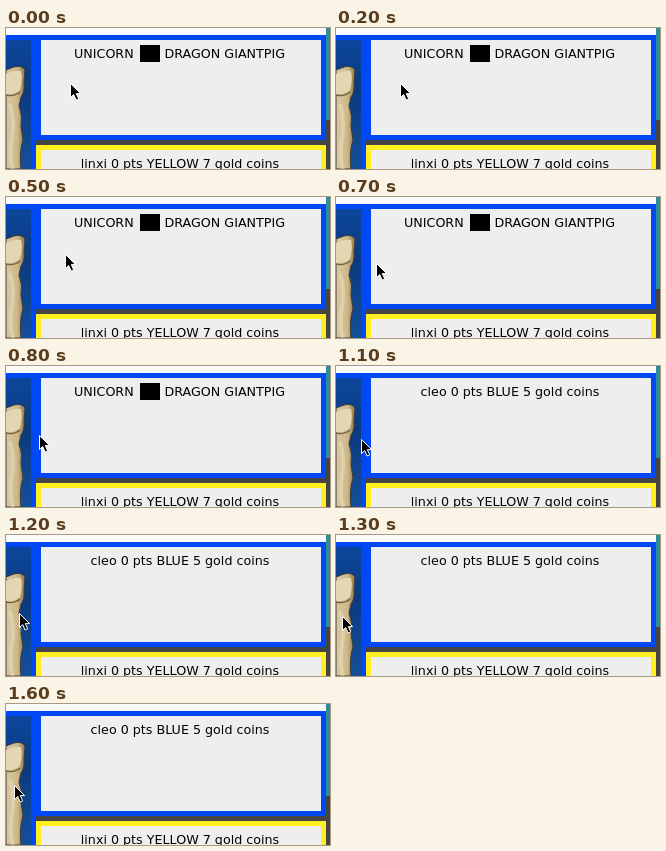
An HTML page that plays this animation: 324 px wide and 141 px high, repeating every 2.27 s.

```html
<!DOCTYPE html>
<html lang="en">
<head>
<meta charset="utf-8">
<style>
  html, body { margin: 0; width: 100%; height: 100%; overflow: hidden; background: #fff; }
  svg { display: block; width: 100%; height: 100%; }
  text { font: 12.7px "DejaVu Sans", "Noto Sans", sans-serif; fill: #000; }
  .mid { text-anchor: middle; }
</style>
</head>
<body>
<svg viewBox="0 0 324 141">
  <defs>
    <linearGradient id="sea" x1="0" y1="0" x2="0" y2="1">
      <stop offset="0" stop-color="#0c469c"/>
      <stop offset=".4" stop-color="#0b3a80"/>
      <stop offset="1" stop-color="#14509a"/>
    </linearGradient>
    <linearGradient id="paper" x1="0" y1="0" x2="1" y2="0">
      <stop offset="0" stop-color="#d9c8a0"/>
      <stop offset=".6" stop-color="#cdb88a"/>
      <stop offset="1" stop-color="#8d7850"/>
    </linearGradient>
    <clipPath id="board"><rect y="12" width="25" height="129"/></clipPath>
  </defs>

  <rect width="324" height="141" fill="#444"/>
  <rect width="320" height="7" fill="#fbfbfd"/>
  <rect x="320" width="4" height="92" fill="#2c8c98"/>

  <!-- board edge with rolled parchment -->
  <rect y="7" width="30" height="134" fill="#0048f4"/>
  <g clip-path="url(#board)">
    <rect y="12" width="25" height="129" fill="url(#sea)"/>
    <path d="M0 42 L8 39 Q16 37 19 42 L18 55 Q19 64 15 69 L13 78 Q17 88 15 98 L17 112 Q13 124 15 141 H0Z"
          fill="url(#paper)" stroke="#3c3a38" stroke-width="1"/>
    <path d="M0 46 Q8 42 15 43 Q17 52 14 62 Q8 67 0 66Z" fill="#e3d6b2"/>
    <path d="M0 67 Q8 69 14 64" fill="none" stroke="#76633f" stroke-width="1.5"/>
    <path d="M4 76 Q9 92 6 110 T7 141" fill="none" stroke="#e6dab9" stroke-width="4" opacity=".6"/>
  </g>

  <!-- player panels -->
  <rect y="7" width="320" height="5" fill="#0048f4"/>
  <rect x="30" y="7" width="290" height="105" fill="#0048f4"/>
  <rect x="35" y="12" width="280" height="95" fill="#eee"/>
  <rect x="30" y="117" width="290" height="30" fill="#ffee20"/>
  <rect x="35" y="122" width="280" height="25" fill="#eee"/>

  <g id="cards">
    <text x="68" y="30">UNICORN</text>
    <rect x="134" y="17" width="20" height="17"/>
    <text x="158.5" y="30">DRAGON GIANTPIG</text>
  </g>
  <text id="score" class="mid" x="174" y="30">cleo 0 pts BLUE 5 gold coins</text>
  <text class="mid" x="174" y="140">linxi 0 pts YELLOW 7 gold coins</text>

  <path id="cursor" d="M.5 .5 V14.5 L3.7 11.5 L6.1 17 L8.7 15.9 L6.3 10.6 H10.6Z"
        fill="#000" stroke="#fff" stroke-width="1" stroke-linejoin="round"/>
</svg>
<script>
  const LOOP = 2270;
  const SWAP = 1100;
  // [time, x, y] of the pointer tip
  const steps = [
    [0, 64, 55], [400, 63, 56], [500, 59, 57], [600, 50, 61], [700, 40, 66],
    [800, 33, 69], [900, 31, 70], [1000, 29, 71], [1100, 25, 73],
    [1200, 13, 78], [1300, 6, 81], [1600, 8, 81]
  ];
  const byId = id => document.getElementById(id);
  const cursor = byId("cursor"), cards = byId("cards"), score = byId("score");
  const show = (el, on) => el.setAttribute("visibility", on ? "visible" : "hidden");

  function draw(now) {
    const t = now % LOOP;
    const [, x, y] = steps.findLast(s => s[0] <= t);
    cursor.setAttribute("transform", `translate(${x} ${y})`);
    show(cards, t < SWAP);
    show(score, t >= SWAP);
  }

  const start = performance.now();
  function tick() {
    draw(performance.now() - start);
    requestAnimationFrame(tick);
  }
  tick();
</script>
</body>
</html>
```
